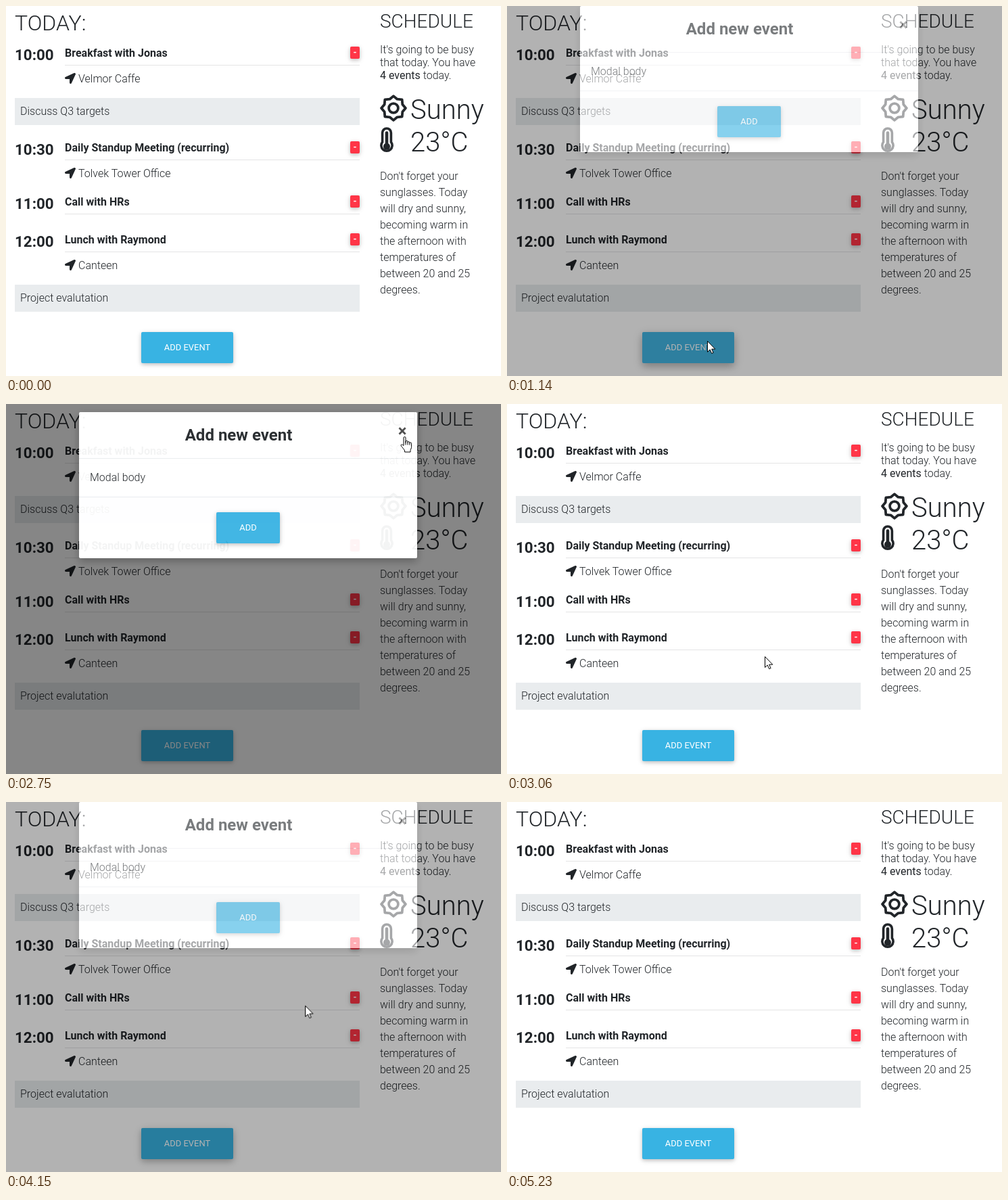
An HTML page that plays this animation: 732 by 547 pixels, repeating every 5.4 s.

```html
<!DOCTYPE html>
<html lang="en">
<head>
<meta charset="utf-8">
<title>Today</title>
<style>
html, body { margin: 0; width: 100%; height: 100%; overflow: hidden; background: #fff; }
body { font: 300 16px/24px Roboto, sans-serif; color: #212529; }
.stage { position: absolute; left: 0; top: 0; width: 732px; height: 547px; overflow: hidden; }
.stage div, .stage section, .stage svg { position: absolute; white-space: nowrap; }
.row { left: 0; width: 523px; }
.time { left: 13px; top: 57px; font: 700 22.4px/30px Roboto, sans-serif; }
.name { left: 87px; top: 58px; font-weight: 700; }
.rule { left: 87px; top: 87px; width: 436px; height: 1px; background: #e4e4e5; }
.place { left: 107px; top: 96px; }
.pin { left: 87px; top: 99px; width: 16px; height: 16px; fill: #212529; }
.note { left: 13px; top: 136px; width: 502px; padding-left: 8px; line-height: 40px; background: #e9ecee; }
.del { left: 509px; top: 60px; width: 14px; height: 18px; border-radius: 2px; background: #ff3547; color: #fff;
  font: 700 13px/17px Roboto, sans-serif; text-align: center; }
.del, .btn { box-shadow: 0 2px 5px rgba(0,0,0,.16), 0 2px 10px rgba(0,0,0,.12); }
.btn { height: 46px; border-radius: 2px; background: #38b3e3; color: #fff;
  font: 400 12.96px/46px Roboto, sans-serif; text-align: center; }
.clip { inset: 0; overflow: hidden; border-radius: 2px; }
.ripple { left: -14px; top: -95px; width: 220px; height: 220px; border-radius: 50%; background: #fff; }
.h1 { left: 13px; top: 6px; font-size: 32px; line-height: 38.4px; }
.h2 { left: 553px; top: 6px; font-size: 28px; line-height: 33.6px; }
.big { left: 598px; font-size: 40px; line-height: 48px; }
.lead { left: 553px; top: 55px; line-height: 19.2px; }
.lead b { font-weight: 400; }
.text { left: 553px; top: 240px; }
.veil { inset: 0; background: rgba(0,0,0,.5); }
.modal { left: 108px; top: 18px; width: 500px; height: 216px; border-radius: 2px; background: #fff;
  box-shadow: 0 5px 11px rgba(0,0,0,.18), 0 4px 15px rgba(0,0,0,.15); }
.modal .title { left: 0; top: 16px; width: 472px; font: 700 24px/36px Roboto, sans-serif; text-align: center; }
.modal .line { left: 0; width: 500px; height: 1px; background: #e9ecef; }
.close { left: 467px; top: 10px; width: 22px; font: 700 24px/36px Roboto, sans-serif; text-align: center; color: #000; opacity: .5; }
.cursor { left: 0; top: 0; width: 0; height: 0; }
.cursor svg { overflow: visible; width: 20px; height: 26px; fill: #fff; stroke: #000; stroke-linejoin: round; }
</style>
</head>
<body>
<svg width="0" height="0" style="position:absolute">
  <symbol id="pin" viewBox="0 0 512 512"><path d="M444.5 3.5L28.7 195.4c-48 22.4-32 92.8 19.2 92.8h176v176c0 51.1 70.3 67.1 92.7 19.1l191.9-415.8c16-38.4-25.6-80-64-64z"/></symbol>
</svg>
<div class="stage">
  <div class="h1">TODAY:</div>
  <section class="row" style="top:0">
    <div class="time">10:00</div><div class="name">Breakfast with Jonas</div><div class="del">-</div><div class="rule"></div>
    <svg class="pin"><use href="#pin"/></svg><div class="place">Velmor Caffe</div>
    <div class="note">Discuss Q3 targets</div>
  </section>
  <section class="row" style="top:140px">
    <div class="time">10:30</div><div class="name">Daily Standup Meeting (recurring)</div><div class="del">-</div><div class="rule"></div>
    <svg class="pin"><use href="#pin"/></svg><div class="place">Tolvek Tower Office</div>
  </section>
  <section class="row" style="top:220px">
    <div class="time">11:00</div><div class="name">Call with HRs</div><div class="del">-</div><div class="rule"></div>
  </section>
  <section class="row" style="top:276px">
    <div class="time">12:00</div><div class="name">Lunch with Raymond</div><div class="del">-</div><div class="rule"></div>
    <svg class="pin"><use href="#pin"/></svg><div class="place">Canteen</div>
    <div class="note">Project evalutation</div>
  </section>
  <div class="btn" id="add" style="left:200px;top:482px;width:136px">
    <div class="clip"><div class="ripple" id="ripple"></div></div>
    <div style="inset:0">ADD EVENT</div>
  </div>

  <div class="h2">SCHEDULE</div>
  <div class="lead">It's going to be busy<br>that today. You have<br><b>4 events</b> today.</div>
  <svg style="left:553px;top:131px" width="40" height="40" viewBox="-20 -20 40 40" fill="none" stroke="#212529" stroke-width="3.8" stroke-linejoin="round">
    <path id="sun"/><circle r="6.9"/>
  </svg>
  <div class="big" style="top:130px">Sunny</div>
  <svg style="left:553px;top:179px" width="20" height="40" viewBox="0 0 20 40" fill="none" stroke="#212529">
    <path stroke-width="3.6" d="M3.6 22.2V8.4a6.4 6.4 0 0 1 12.8 0v13.8a8.1 8.1 0 1 1-12.8 0z"/>
    <path stroke-width="4.6" stroke-linecap="round" d="M10 8.6v18"/><circle cx="10" cy="28.7" r="5" fill="#212529" stroke="none"/>
  </svg>
  <div class="big" style="top:178px">23°C</div>
  <div class="text">Don't forget your<br>sunglasses. Today<br>will dry and sunny,<br>becoming warm in<br>the afternoon with<br>temperatures of<br>between 20 and 25<br>degrees.</div>

  <div class="veil" id="veil">
    <div class="modal" id="modal">
      <div class="title">Add new event</div>
      <div class="close" id="close">×</div>
      <div class="line" style="top:68px"></div>
      <div style="left:16px;top:85px">Modal body</div>
      <div class="line" style="top:125px"></div>
      <div class="btn" style="left:203px;top:148px;width:94px">ADD</div>
    </div>
  </div>

  <div class="cursor" id="cursor">
    <svg id="arrow"><path d="M.5.5v16l3.7-3.5 2.5 5.6 2.4-1-2.4-5.4h5.1z"/></svg>
    <svg id="hand" style="left:-6px"><path d="M5 13.5V2a1.5 1.5 0 0 1 3 0v7.2V7.6a1.5 1.5 0 0 1 3 .2v1.6-.8a1.5 1.5 0 0 1 2.9.4v1.2-.4a1.4 1.4 0 0 1 2.7.5v5.2c0 2-1.2 3.2-1.6 5v2.5H6.6v-2c-1-2.5-3.7-4.5-5.3-7.3-.8-1.5 1-2.6 2.2-1.4z"/><path fill="none" d="M8 9v3.5M11 9.4v3.1M13.9 10.2v2.5"/></svg>
  </div>
</div>
<script>
const LOOP = 5400, TICK = 76.9, TICKS = 70;
const $ = id => document.getElementById(id);
const tracks = [];

// Keys are [tick, value, easing]; the clock below sets the position.
function track(id, prop, keys, easing = 'linear') {
  const first = keys[0], last = keys[keys.length - 1];
  const frames = [[0, first[1]], ...keys, [TICKS, last[1]]]
    .map(([k, v, e]) => ({ offset: k / TICKS, [prop]: v, easing: e || easing }));
  const a = $(id).animate(frames, { duration: TICKS, fill: 'both' });
  a.pause();
  tracks.push(a);
}
const at = (k, x, y, e) => [k, `translate(${x}px, ${y}px)`, e];
const drop = (k, y) => at(k, 0, y);

$('sun').setAttribute('d', 'M' + Array.from({ length: 16 }, (_, i) => {
  const r = i % 2 ? 14.4 : 17.9, a = i * Math.PI / 8;
  return (r * Math.sin(a)).toFixed(2) + ' ' + (-r * Math.cos(a)).toFixed(2);
}).join('L') + 'z');

track('veil', 'opacity', [
  [14, 0], [15, .6], [16, 1], [35, 1], [36, .95], [37, .4], [38, 0],
  [53, 0], [54, .6], [55, 1], [63, 1], [64, .95], [65, .4], [66, 0]
]);
track('modal', 'transform', [
  drop(14, -50), drop(15, -18), drop(16, -6), drop(17, -1), drop(18, 0),
  drop(35, 0), drop(36, -6), drop(37, -27), drop(38, -50),
  drop(53, -50), drop(54, -18), drop(55, -4), drop(56, 0),
  drop(63, 0), drop(64, -6), drop(65, -27), drop(66, -50)
]);
track('close', 'opacity', [[31, .5], [33, .72], [38, .72], [39, .5]]);

const low = '0 2px 5px rgba(0,0,0,.16), 0 2px 10px rgba(0,0,0,.12)';
const high = '0 5px 11px rgba(0,0,0,.18), 0 4px 15px rgba(0,0,0,.15)';
track('add', 'boxShadow', [[3, low], [5, high], [16, high], [18, low], [43, low], [45, high], [53, high], [55, low]]);
track('ripple', 'transform', [
  [9, 'scale(0)'], [12, 'scale(1)'], [20, 'scale(1)'], [21, 'scale(0)'], [47, 'scale(0)'], [50, 'scale(1)']
]);
track('ripple', 'opacity', [[9, .25], [12, .22], [16, 0], [40, 0], [47, .25], [50, .22], [52, .13], [54, 0]]);

track('cursor', 'transform', [
  at(1, 507, 521, 'ease-in-out'), at(5, 296, 500), at(8, 296, 500), at(9, 296, 495),
  at(15, 296, 495, 'ease-in'), at(20, 295, 279, 'ease-out'), at(22, 297, 257),
  at(24, 297, 257, 'ease-in-out'), at(33, 589, 48), at(36, 589, 48, 'ease-in-out'),
  at(40, 381, 373, 'ease-out'), at(45, 285, 500), at(48, 285, 500, 'ease-out'),
  at(52, 400, 343, 'ease-out'), at(55, 450, 293), at(63, 450, 293, 'ease-in'), at(67, 515, 550)
]);
track('cursor', 'opacity', [[0, 0], [1, 1], [67, 0]], 'step-end');
track('hand', 'opacity', [[0, 0], [4, 1], [14, 0], [32, 1], [38, 0], [43, 1], [49, 0]], 'step-end');
track('arrow', 'opacity', [[0, 1], [4, 0], [14, 1], [32, 0], [38, 1], [43, 0], [49, 1]], 'step-end');

let start;
function draw(now) {
  start ??= now;
  const t = (now - start) % LOOP;
  const k = Math.min(TICKS - 1, Math.floor((t + 25) / TICK));
  for (const a of tracks) a.currentTime = k;
  requestAnimationFrame(draw);
}
for (const a of tracks) a.currentTime = 0;
requestAnimationFrame(draw);
</script>
</body>
</html>
```
